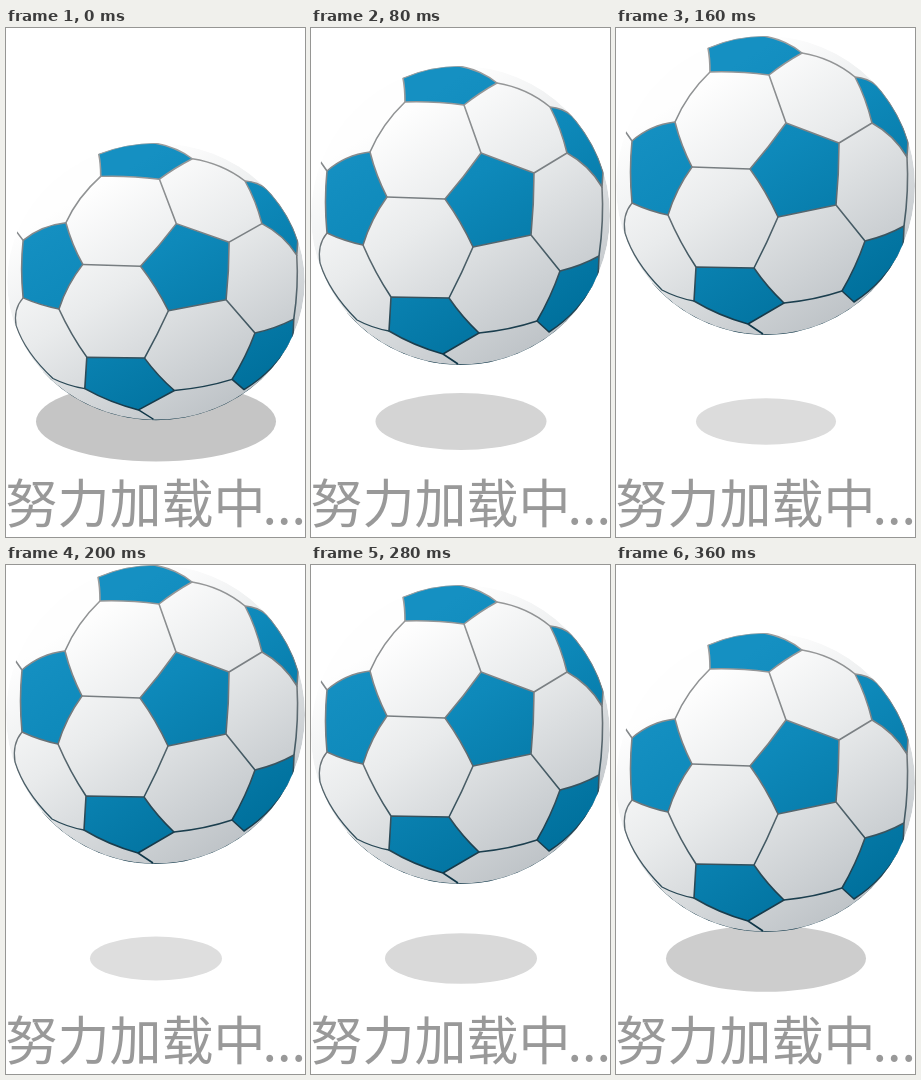
An HTML page for the animation above (400 ms loop, 299 by 509 pixels).

```html
<!DOCTYPE html>
<html lang="zh">
<head>
<meta charset="utf-8">
<style>
html, body { margin: 0; width: 100%; height: 100%; overflow: hidden; background: #fff; }
svg { display: block; width: 299px; height: 509px; }
text { font: 400 52px "Noto Sans CJK SC", "Noto Sans CJK", sans-serif; fill: #999; }
</style>
</head>
<body>
<svg viewBox="0 0 299 509">
  <defs>
    <linearGradient id="white" gradientUnits="userSpaceOnUse" x1="70" y1="60" x2="215" y2="285">
      <stop offset="0" stop-color="#fefefe"/><stop offset=".4" stop-color="#e9ebec"/><stop offset="1" stop-color="#bfc4c8"/>
    </linearGradient>
    <linearGradient id="blue" gradientUnits="userSpaceOnUse" x1="70" y1="60" x2="215" y2="285">
      <stop offset="0" stop-color="#1590c2"/><stop offset=".35" stop-color="#0e89ba"/><stop offset="1" stop-color="#00709c"/>
    </linearGradient>
    <linearGradient id="seam" gradientUnits="userSpaceOnUse" x1="110" y1="0" x2="160" y2="299">
      <stop offset="0" stop-color="#a0a0a0"/><stop offset=".5" stop-color="#70777b"/><stop offset=".8" stop-color="#2c4a57"/><stop offset="1" stop-color="#0b3345"/>
    </linearGradient>
    <clipPath id="round"><circle cx="149.5" cy="149.5" r="149.5"/></clipPath>
  </defs>
  <ellipse id="shadow" cx="150" cy="393.5"/>
  <g id="ball">
    <g clip-path="url(#round)">
      <circle cx="149.5" cy="149.5" r="149.5" fill="url(#white)"/>
      <g fill="none" stroke="url(#seam)" stroke-width="1.6" stroke-linejoin="round">
        <path d="M59 86Q71 58 94 36M153 39L170 87M186 17Q216 22 239 41M223 107L256 87M76 131L134 133M52 179Q64 207 80 231M138 232Q151 207 162 181M220 169L249 205M168 267Q199 264 226 255M9 95L16 105M132 288L147 298M291 121Q293 155 288 190"/>
        <path d="M16 167Q6 179 9 197Q18 226 46 254Q61 262 78 265" stroke-width="1.3"/>
        <path d="M285 214A149.500 149.500 0 0 1 145 299"/>
        <path d="M36 247A149.500 149.500 0 0 0 145 299" stroke-width="1"/>
        <g fill="url(#blue)">
          <path d="M92 12Q119 0 148 0Q170 4 186 17Q168 27 153 39Q122 35 94 36Q94 22 92 12Z"/>
          <path d="M239 41Q252 42 261 50Q284 77 292 106L291 121Q278 99 256 87Q250 62 239 41Z"/>
          <path d="M170 87L223 107Q223 138 220 169L162 181Q150 155 134 133Q153 111 170 87Z"/>
          <path d="M16 105Q34 89 59 86Q65 110 76 131Q60 153 52 179Q33 175 16 167Q13 135 16 105Z"/>
          <path d="M80 231L138 232Q151 251 168 267L132 288Q103 280 78 265Z"/>
          <path d="M249 205Q270 200 288 190L287 212Q269 246 238 266L226 255Q240 231 249 205Z"/>
        </g>
      </g>
    </g>
  </g>
  <text x="-.5" y="494.7">努力加载中</text>
  <text x="256.5" y="495.5">...</text>
</svg>
<script>
const ball = document.getElementById("ball");
const shadow = document.getElementById("shadow");
const STEP = 40, COUNT = 10;

// ball top, shadow half-width, shadow grey; rising half of the bounce
const poses = [
  [115, 120, 197],
  [68, 100, 205],
  [38, 85.5, 212],
  [20, 76, 217],
  [8, 70, 220],
  [0, 66, 222]
];

function draw(now) {
  const i = Math.floor(now / STEP) % COUNT;
  const [top, rx, grey] = poses[Math.min(i, COUNT - i)];
  const squash = i ? "" : " translate(1.2 0) scale(.995 .927)";
  ball.setAttribute("transform", `translate(0 ${top})${squash}`);
  shadow.setAttribute("rx", rx);
  shadow.setAttribute("ry", rx / 3);
  shadow.setAttribute("fill", `rgb(${grey},${grey},${grey})`);
}

const start = performance.now();
function tick() {
  draw(performance.now() - start);
  requestAnimationFrame(tick);
}
tick();
</script>
</body>
</html>
```
